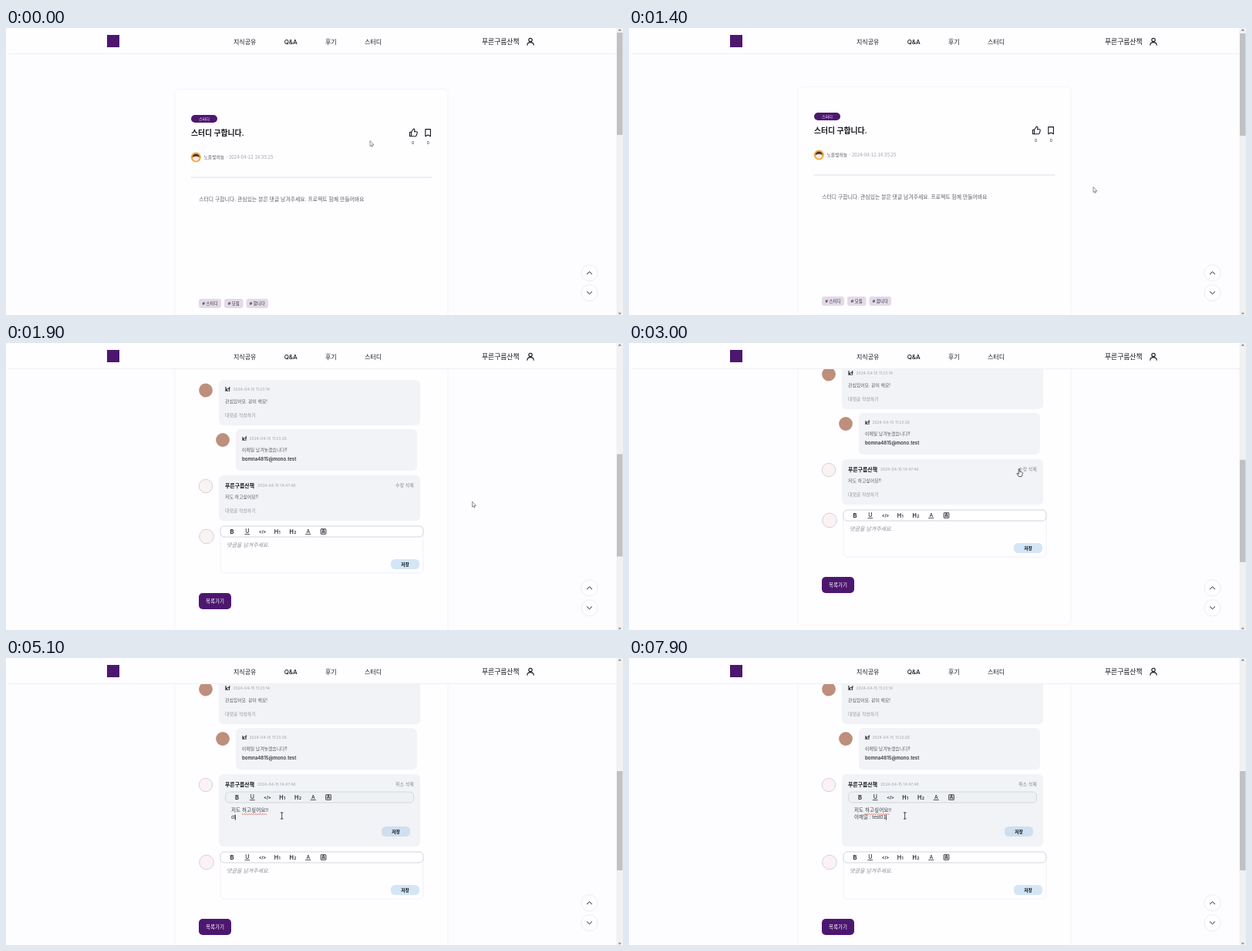
Write an HTML page that moves like this. It is 800x373 px and loops after 8 s.

```html
<!DOCTYPE html>
<html lang="ko">
<head>
<meta charset="utf-8">
<title>스터디</title>
<style>
html, body { margin: 0; width: 100%; height: 100%; overflow: hidden; background: #fdfcfe; }
svg { display: block; width: 800px; height: 373px; }
text { font-family: Inter, "Noto Sans CJK KR", "Noto Sans CJK", sans-serif; white-space: pre; }
.plain { font-family: "Noto Sans CJK KR", "Noto Sans CJK", sans-serif; }
.edit { font-family: "Liberation Sans", "Noto Sans CJK KR", "Noto Sans CJK", sans-serif; }
</style>
</head>
<body>
<svg id="stage" viewBox="0 0 800 373" xmlns="http://www.w3.org/2000/svg"></svg>
<script>
const INK = '#17171c', GREY = '#5c5c64', PALE = '#a3a3aa', PURPLE = '#4d176f', BOX = '#f1f3f6', PAPER = '#fefdff';
const USER = '푸른구름산책', GUEST = 'kf';

// y is the vertical middle of the line
const text = (x, y, size, str, fill = INK, weight = 400, extra = '') =>
  `<text x="${x}" y="${(y + size * 0.37).toFixed(2)}" font-size="${size}" fill="${fill}" font-weight="${weight}" ${extra}>${str}</text>`;
const mid = 'text-anchor="middle"';
const rect = (x, y, w, h, r, fill, stroke = 'none') =>
  `<rect x="${x}" y="${y}" width="${w}" height="${h}" rx="${r}" fill="${fill}" stroke="${stroke}"/>`;
const circle = (x, y, r, fill, stroke = 'none', sw = 1) =>
  `<circle cx="${x}" cy="${y}" r="${r}" fill="${fill}" stroke="${stroke}" stroke-width="${sw}"/>`;
const path = (d, stroke = INK, sw = 1, fill = 'none') =>
  `<path d="${d}" stroke="${stroke}" stroke-width="${sw}" fill="${fill}" stroke-linejoin="round" stroke-linecap="round"/>`;
const group = (id, body) => `<g id="${id}">${body}</g>`;

const guestFace = (x, y) => circle(x, y, 8.9, '#bd8f7c');
const userFace = (x, y, r) => circle(x, y, r, '#fbf2f3', '#c9c9ce', 0.8);

function tag(x, w, str) {
  return rect(x, 352, w, 12, 3, '#e3dae8') + text(x + w / 2, 358, 5.4, '# ' + str, '#2b2033', 500, mid);
}

function tools(x, y, w, fill) {
  const at = i => x + 15 + i * 19.75;
  const c = '#25252b';
  const bar = (cx, half, dy) => path(`M${cx - half} ${y + dy}h${half * 2}`, c, 0.8);
  const head = (i, n) => text(at(i) - 4.6, y, 7.2, 'H', c, 600) + text(at(i) + 1.2, y + 1, 5.2, n, c, 600);
  return rect(x, y - 7, w, 14, 5, fill, '#d4d6dc') +
    text(at(0), y, 7.6, 'B', c, 700, mid) +
    text(at(1), y - 0.6, 7, 'U', c, 500, mid) + bar(at(1), 3, 3.6) +
    text(at(2), y, 5.4, '&lt;/&gt;', c, 700, mid) +
    head(3, 1) + head(4, 2) +
    text(at(5), y - 0.8, 6.6, 'A', c, 500, mid) + bar(at(5), 3.2, 3.4) +
    rect(at(6) - 3.4, y - 3.4, 6.8, 6.8, 0.5, '#c9c9ce', '#55555c') +
    text(at(6), y, 5.6, 'A', c, 600, mid);
}

const saveButton = (x, y, fill) =>
  rect(x, y, 37, 13, 5.5, fill) + text(x + 18.5, y + 6.5, 5.8, '저장', INK, 600, mid);

function postArea() {
  const thumb = 'M523.5 135.2h2v5.6h-2zM525.5 135.2l3-4.2c1.3.1 1.6 1 1.4 2.1l-.4 1.7h2.7c.9 0 1.2.7 1 1.5l-1.1 3.5c-.2.7-.6 1-1.3 1h-5.3';
  return rect(240, 113, 34, 10, 5, PURPLE) +
    text(257, 118, 5.1, '스터디', '#fff', 500, mid) +
    text(240, 136.5, 9.8, '스터디 구합니다.', INK, 600) +
    path(thumb, INK, 1.1) + path('M543.8 131.6h6.6v9.2l-3.3-1.7-3.3 1.7z', INK, 1.1) +
    text(527.6, 149, 5, '0', INK, 400, mid) + text(547.3, 149, 5, '0', INK, 400, mid) +
    circle(246.3, 168, 6.5, '#f3a73a') + circle(246.3, 168.6, 4.2, '#fbe9dc') +
    path('M242.2 167.6a4.1 3.6 0 0 1 8.2 0q-4-2-8.2 0z', '#3a2b2b', 0.4, '#3a2b2b') +
    text(256.5, 168, 5.8, '노을빛하늘', GREY, 400, 'class="plain"') +
    text(285, 168, 6.2, '- 2024-04-12 14:35:25', PALE, 400, 'class="plain"') +
    path('M240 194h312', '#dedee3', 1) +
    text(250.3, 222, 6.83, '스터디 구합니다. 관심있는 분은 댓글 남겨주세요. 프로젝트 함께 만들어봐요', GREY) +
    tag(250, 29, '스터디') + tag(283, 24.5, '모집') + tag(311.5, 28.5, '합니다') +
    path('M240 394.5h312', '#eeeef1', 1);
}

function comments() {
  const dots = [254.4, 256.6, 258.8].map(x => circle(x, 419.5, 0.6, '#fff')).join('');
  return path('M252.8 416.4h7.8v6.2h-3.2l-1.4 1.8-.9-1.8h-2.3z', '#0c0c10', 0.8, '#0c0c10') + dots +
    text(266, 421.5, 8, '댓글 3', INK, 500) +
    rect(276, 443, 261, 59, 6, BOX) + guestFace(259, 456.5) +
    text(284, 455.6, 7, GUEST, INK, 700) +
    text(294.5, 455.2, 4.95, '2024-04-15 11:23:14', PALE) +
    text(284, 470.8, 5.85, '관심있어요. 같이 해요!', GREY) +
    text(284, 488.5, 5.9, '대댓글 작성하기', '#96969e') +
    rect(298, 507, 235, 54, 6, BOX) + guestFace(281, 521) +
    text(306, 519.6, 6.5, GUEST, INK, 700) +
    text(315.5, 519.3, 4.95, '2024-04-15 11:23:26', PALE) +
    text(306, 533.8, 5.85, '이메일 남겨놓겠습니다!!', GREY) +
    text(306, 546, 6.1, 'bomna4815@mono.test', '#33333a', 600);
}

function mineHead(height, action) {
  return rect(276, 567, 261, height, 6, BOX) + userFace(259, 581, 8.7) +
    text(284, 580.2, 6.9, USER, INK, 600) +
    text(326, 580, 4.95, '2024-04-15 14:47:46', PALE) +
    text(505, 580, 6, action + ' 삭제', '#85858d');
}

const mineView = () => mineHead(59, '수정') +
  text(284, 595, 5.9, '저도 하고싶어요!!', GREY) + text(284, 613.3, 5.9, '대댓글 작성하기', '#96969e');

function mineEdit() {
  let wave = 'M306 618.4';
  for (let i = 1; i <= 21; i++) wave += `L${306 + i * 1.5} ${i % 2 ? 619.5 : 618.4}`;
  return mineHead(94, '취소') + tools(284.5, 597, 244, '#eef1f4') +
    text(292, 614, 6.6, '저도 하고싶어요!!', '#3c3c44', 400, 'class="edit" id="line1"') +
    path(wave, '#e4524d', 0.7) +
    text(292, 623, 6.5, '', '#3c3c44', 400, 'class="edit" id="line2"') +
    '<path id="compose" stroke="#222" stroke-width=".7"/><path id="caret" stroke="#111" stroke-width=".8"/>' +
    saveButton(487, 635, '#cddff0');
}

const lower = () => userFace(260, 646.5, 9.3) +
  rect(278, 633.5, 263, 60.5, 5, PAPER, '#f1f1f4') + tools(278, 640, 263, '#fff') +
  text(286, 657.3, 7, '댓글을 남겨주세요.', '#8d8d94', 400, 'font-style="italic"') +
  saveButton(499, 676, '#d4e6f5') +
  rect(250, 720, 42, 21, 5, PURPLE) + text(271, 730.3, 6.5, '목록가기', '#fff', 500, mid);

const header = () => rect(0, 0, 792, 33, 0, PAPER) + path('M4 33.5h788', '#efeff2', 1) +
  rect(131, 9, 16, 16, 0, PURPLE) +
  [[295, '지식공유'], [360.7, 'Q&amp;A'], [414, '후기'], [465, '스터디']]
    .map(([x, s]) => text(x, 17.7, 8, s, INK, 500)).join('') +
  text(617, 17.5, 8.8, USER, INK, 500) +
  circle(680, 15.4, 2.2, 'none', INK, 1.1) + path('M675.8 22.2c.3-4.8 8.1-4.8 8.4 0', INK, 1.1);

const roundButtons = () => [[318.3, -1], [344.3, 1]].map(([y, d]) =>
  circle(756.5, y, 10.6, PAPER, '#e8e8ec', 0.8) +
  path(`M753.4 ${y - 1.5 * d}l3.1 ${3 * d}l3.1 ${-3 * d}`, INK, 1)).join('');

const scrollbar = () => rect(791.5, 0, 8.5, 373, 0, '#f1f1f2') +
  '<rect id="thumb" x="792" width="7.5" fill="#c1c1c3"/>' +
  path('M794.3 3.2l1.5-1.6 1.5 1.6z', '#777', 0.4, '#777') +
  path('M794.3 370.6l1.5 1.6 1.5-1.6z', '#777', 0.4, '#777');

// each pointer has its hot spot at 0,0
const pointers = () =>
  group('arrow', path('M0 0v6.6l1.5-1.3 1 2.2 1-.5-1-2.1h2z', '#4a4a50', 0.6, '#fff')) +
  group('hand', path('M-.8.7q.8-1.3 1.5 0v3.5l3 .7q.9.3.7 1.3l-.6 2.6-.8 1.8h-3.6l-2.4-3.7q.1-1.2 1.2-.5l1 .9z', '#222', 0.75, '#fff')) +
  group('beam', path('M-1.4-4h2.8M0-4v8M-1.4 4h2.8', '#222', 0.8));

document.getElementById('stage').innerHTML =
  group('page',
    `<rect id="frame" x="219" y="79.5" width="354" rx="5" fill="${PAPER}" stroke="#f4f4f6"/>` +
    postArea() + comments() + group('view', mineView()) + group('edit', mineEdit()) + group('lower', lower())) +
  header() + roundButtons() + scrollbar() + pointers();

const $ = id => document.getElementById(id);
const set = (id, attrs) => { for (const k in attrs) $(id).setAttribute(k, attrs[k]); };
const show = (id, on) => { $(id).style.display = on ? '' : 'none'; };

const LOOP = 8000, STEP = 100, EDIT = 3500;
const SCROLL = [[1300, 0], [1400, 3], [1500, 70], [1600, 165], [1700, 261], [1800, 345], [1900, 395], [2000, 416]];
const MOVE = [[400, 472, 147], [700, 474, 180], [1000, 472, 243], [1100, 472, 243], [1300, 596, 210], [1400, 602, 207],
  [1700, 604.5, 206.5], [2000, 604.5, 206.5], [2300, 548, 190], [2400, 548, 190], [2900, 506, 163], [3500, 506, 163],
  [3800, 508.5, 169], [3900, 508.5, 169], [4200, 357.7, 205]];
const TYPED = [[0, ''], [5000, 'd'], [5100, 'dl'], [5200, 'dla'], [5300, 'dlap'], [5400, 'dlapd'], [5500, 'dlapdl'],
  [5600, 'dlapdlf'], [5800, 'dlap'], [5900, 'd'], [6000, ''], [6100, 'ㅇ'], [6200, '이'], [6300, '이메'], [6400, '이멩'],
  [6500, '이메이'], [6600, '이메일'], [6800, '이메일 '], [6900, '이메일 :'], [7100, '이메일 : '], [7300, '이메일 : t'],
  [7400, '이메일 : te'], [7500, '이메일 : tes'], [7600, '이메일 : test'], [7800, '이메일 : test0'], [7900, '이메일 : test01']];

function track(keys, t) {
  const i = keys.findIndex(k => k[0] > t);
  if (i === 0) return keys[0].slice(1);
  if (i < 0) return keys[keys.length - 1].slice(1);
  const a = keys[i - 1], b = keys[i], p = (t - a[0]) / (b[0] - a[0]);
  return a.slice(1).map((v, j) => v + (b[j + 1] - v) * p);
}

function drawEditor(t) {
  const line = $('line2');
  const typed = TYPED.filter(k => k[0] <= t).pop()[1];
  line.textContent = typed;
  const second = t >= 4600;
  const width = second ? (typed ? line.getComputedTextLength() : 0)
    : t >= 4400 ? $('line1').getComputedTextLength() : 0;
  const x = 292.3 + width, y = second ? 619.6 : 610.6;
  set('caret', { d: `M${x} ${y}v7` });
  const composing = t >= 6100 && t < 6700;
  set('compose', { d: composing ? `M${x - 6} 626.5h5.8` : '' });
}

function draw(now) {
  const t = Math.floor(now % LOOP / STEP) * STEP;
  const editing = t >= EDIT;
  const [scroll] = track(SCROLL, t);
  const [x, y] = track(MOVE, t);
  set('page', { transform: `translate(0 ${-scroll})` });
  set('frame', { height: editing ? 737.5 : 702.5 });
  set('lower', { transform: `translate(0 ${editing ? 35 : 0})` });
  set('thumb', { y: 6 + scroll * (editing ? 0.339 : 0.3505), height: editing ? 129 : 133 });
  show('view', !editing);
  show('edit', editing);
  if (editing) drawEditor(t);
  const kind = t >= 2500 && x >= 505 && x < 529 && y < 168.5 ? 'hand' : editing && y > 189 ? 'beam' : 'arrow';
  for (const id of ['arrow', 'hand', 'beam']) show(id, id === kind);
  set(kind, { transform: `translate(${x} ${y})` });
}

function tick() {
  draw(performance.now());
  requestAnimationFrame(tick);
}
tick();
</script>
</body>
</html>
```
